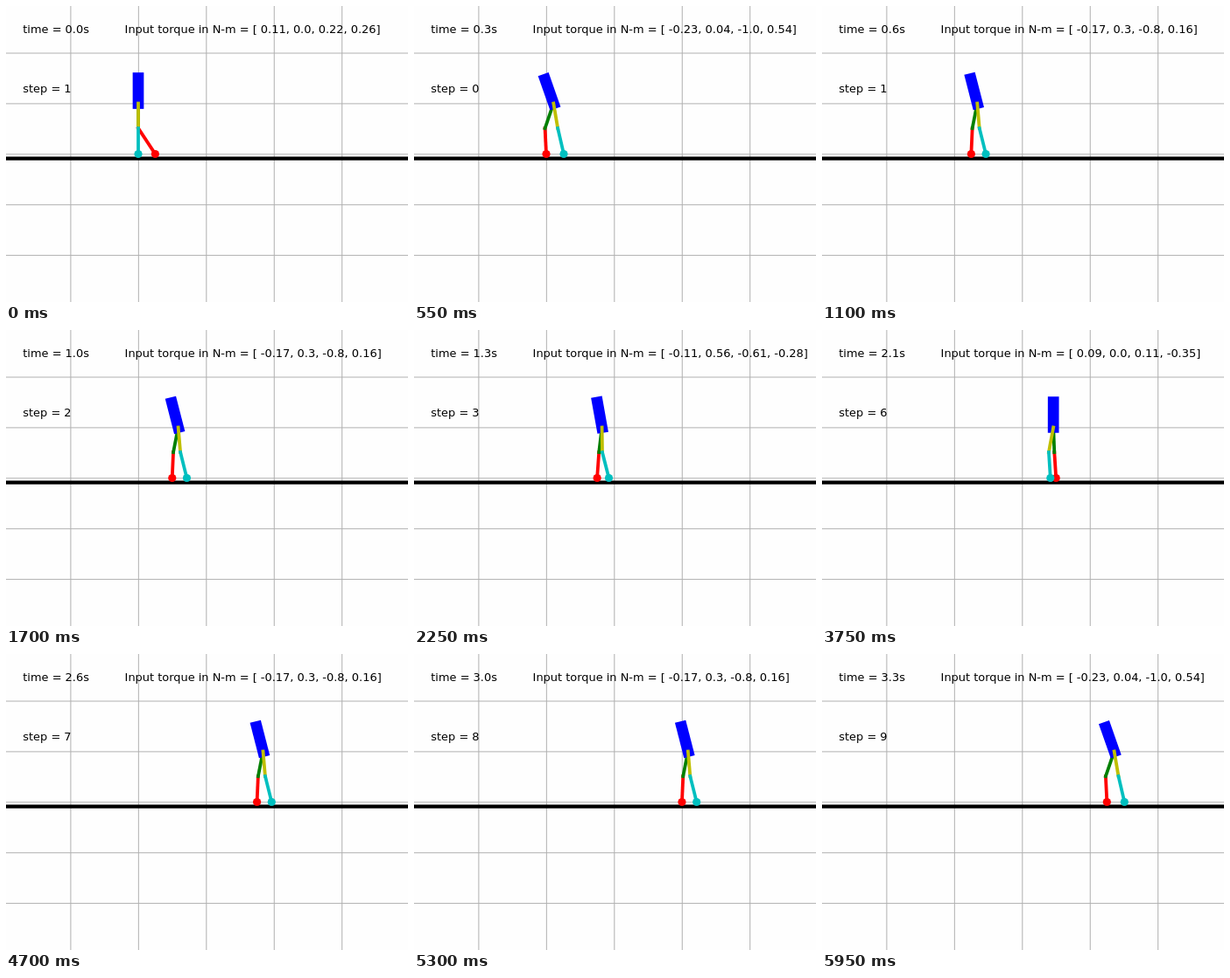
These frames come from a looping animation (459x339 px, 6000 ms). An HTML page with a canvas:

```html
<!DOCTYPE html>
<html lang="en">
<head>
<meta charset="utf-8">
<title>Biped walk</title>
<style>
html, body { margin: 0; width: 100%; height: 100%; overflow: hidden; background: #fefefe; }
canvas { display: block; }
</style>
</head>
<body>
<canvas id="stage" width="459" height="339"></canvas>
<script>
const ctx = document.getElementById('stage').getContext('2d');
const FRAME_MS = 50, FRAMES = 120, PER_STEP = 12, STRIDE = 19.37;
const ORIGIN = 151, HIP_Y = 111.5, KNEE_Y = 140, FOOT_Y = 169.5, TORSO = 29;

// Each step repeats one gait; v runs from about -1 to 1 within a step.
function walkingPose(frame) {
  const step = Math.floor(frame / PER_STEP), phase = frame % PER_STEP;
  const v = (phase - 6) / 5;
  const foot = ORIGIN + STRIDE * step;
  const hip = foot + 1.42 * phase - 7.3;
  const swing = foot + 3.3 * phase - 16.3;
  return {
    step, foot, hip, swing,
    knee: (foot + hip) / 2 - (4 + 1.6 * v) * v ** 4,
    swingKnee: (swing + hip) / 2 - 5 + 4 * v * v,
    lean: (-1.8 - 8.5 * v - 9 * v * v) * Math.PI / 180,
    torque: [
      0.02 - 0.17 * v - 0.08 * v * v,
      0.56 * Math.exp(-(((v - 0.6) / 0.25) ** 2)),
      -0.17 - 0.6 * v - 0.23 * v * v,
      0.07 + 0.06 * v + 0.43 * Math.cos(6 * v)
    ]
  };
}

// The walk starts upright, with the stance foot already one stride ahead.
function startPose() {
  return { ...walkingPose(0), step: 1, foot: ORIGIN + STRIDE, hip: ORIGIN, knee: ORIGIN,
           swingKnee: ORIGIN, swing: ORIGIN, lean: 0 };
}

function line(color, width, x1, y1, x2, y2) {
  ctx.strokeStyle = color;
  ctx.lineWidth = width;
  ctx.beginPath();
  ctx.moveTo(x1, y1);
  ctx.lineTo(x2, y2);
  ctx.stroke();
}

function dot(color, x) {
  ctx.fillStyle = color;
  ctx.beginPath();
  ctx.arc(x, FOOT_Y, 4.6, 0, 2 * Math.PI);
  ctx.fill();
}

function number(v) {
  const n = +v.toFixed(2);
  return Number.isInteger(n) ? n.toFixed(1) : String(n);
}

function drawAxes() {
  ctx.fillStyle = '#fefefe';
  ctx.fillRect(0, 0, 459, 339);
  ctx.lineCap = 'butt';
  for (let i = 0; i < 5; i++) {
    const x = 73.9 + 77.45 * i, y = 54 + 57.9 * i;
    line('#b0b0b0', 1, x, 0, x, 339);
    line('#b0b0b0', 1, 0, y, 459, y);
  }
  line('#000', 4.2, 0, 174.7, 459, 174.7);
}

function drawWalker(p) {
  ctx.lineCap = 'square';
  line('#f00', 3.8, p.foot, FOOT_Y, p.knee, KNEE_Y);
  dot('#f00', p.foot);
  line('#008000', 3.8, p.knee, KNEE_Y, p.hip, HIP_Y);
  line('#00f', 12.7, p.hip, HIP_Y,
       p.hip + TORSO * Math.sin(p.lean), HIP_Y - TORSO * Math.cos(p.lean));
  line('#bfbf00', 3.8, p.hip, HIP_Y, p.swingKnee, KNEE_Y);
  line('#00bfbf', 3.8, p.swingKnee, KNEE_Y, p.swing, FOOT_Y);
  dot('#00bfbf', p.swing);
}

function draw(frame) {
  const p = frame ? walkingPose(frame) : startPose();
  drawAxes();
  drawWalker(p);
  ctx.fillStyle = '#000';
  ctx.font = '12.95px "DejaVu Sans", sans-serif';
  ctx.fillText(`time = ${(frame * 0.028).toFixed(1)}s`, 19.3, 31);
  ctx.fillText(`step = ${p.step}`, 19.3, 99.4);
  ctx.fillText(`Input torque in N-m = [ ${p.torque.map(number).join(', ')}]`, 135.6, 31);
}

const start = performance.now();
function tick() {
  draw(Math.floor((performance.now() - start) / FRAME_MS) % FRAMES);
  requestAnimationFrame(tick);
}
tick();
</script>
</body>
</html>
```
